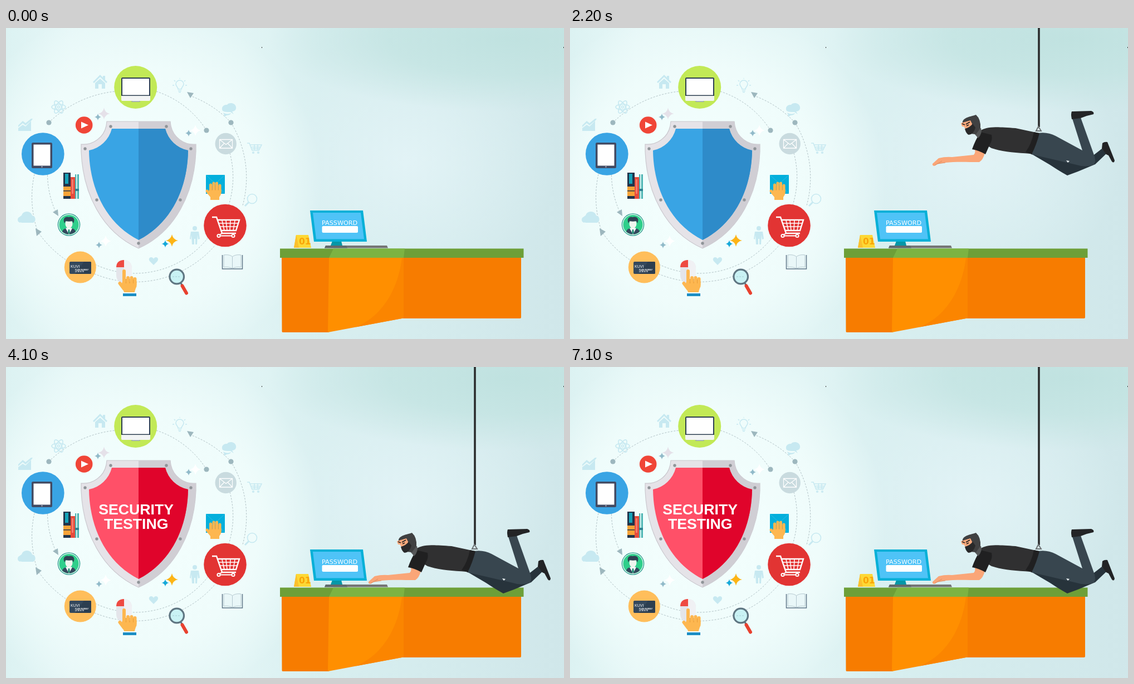
Recreate the animation shown at these times as an HTML page. Size 1002 px wide and 559 px high, loop 7600 ms.

```html
<!DOCTYPE html>
<html lang="en">
<head>
<meta charset="utf-8">
<title>Security testing</title>
<style>
html, body { margin: 0; width: 100%; height: 100%; overflow: hidden; background: #e2f4f4; }
svg { display: block; width: 1002px; height: 559px; }
.pale { fill: #c7e9f1; }
.paleLine { fill: none; stroke: #c7e9f1; stroke-width: 1.6; }
.dash { fill: none; stroke: #aebfc3; stroke-width: 1; stroke-dasharray: 3 2.4; }
.node { fill: #9db7be; }
.finger { fill: none; stroke: #fdb750; stroke-linecap: round; }
.title { font: bold 26.67px "Liberation Sans", Arial, sans-serif; fill: #fff; text-anchor: middle; }
.field { font: 11.2px "DejaVu Sans", sans-serif; fill: #fff; }
.sign { font: bold 15.6px "DejaVu Sans", sans-serif; fill: #f9a408; }
.card { font: 7px "Liberation Sans", sans-serif; fill: #fff; }
.tiny { font: italic bold 3px "Liberation Sans", sans-serif; fill: #fff; }
</style>
</head>
<body>
<svg viewBox="0 0 1002 559" xmlns="http://www.w3.org/2000/svg">
<defs>
  <linearGradient id="base">
    <stop offset="0" stop-color="#dcf2f2"/><stop offset=".12" stop-color="#e6f7f7"/>
    <stop offset=".42" stop-color="#e2f5f5"/><stop offset=".56" stop-color="#d8eff0"/>
    <stop offset="1" stop-color="#d0e7ea"/>
  </linearGradient>
  <radialGradient id="halo">
    <stop offset="0" stop-color="#f4fffe"/><stop offset=".65" stop-color="#effcfb"/>
    <stop offset="1" stop-color="#effcfb" stop-opacity="0"/>
  </radialGradient>
  <radialGradient id="glow">
    <stop offset="0" stop-color="#e2f3f6"/><stop offset="1" stop-color="#e2f3f6" stop-opacity="0"/>
  </radialGradient>
  <radialGradient id="shade">
    <stop offset="0" stop-color="#c0e2e0"/><stop offset=".5" stop-color="#c3e4e2" stop-opacity=".8"/>
    <stop offset="1" stop-color="#c6e5e3" stop-opacity="0"/>
  </radialGradient>
  <path id="star" d="M0-10Q1.6-1.6 10 0Q1.6 1.6 0 10Q-1.6 1.6-10 0Q-1.6-1.6 0-10Z"/>
  <clipPath id="rightHalf"><rect x="238" y="160" width="110" height="245"/></clipPath>
  <path id="rim" d="M181 168H295L296 176A42 42 0 0 0 341 209V222C338 296 305 366 238 396C171 366 138 296 135 222V209A42 42 0 0 0 180 176Z"/>
  <path id="plate" d="M190 181H286A53 53 0 0 0 327 220C326 288 297 351 238 381C179 351 150 288 149 220A53 53 0 0 0 190 181Z"/>
</defs>

<rect width="1002" height="559" fill="url(#base)"/>
<ellipse cx="720" cy="240" rx="270" ry="230" fill="url(#glow)"/>
<ellipse cx="900" cy="20" rx="430" ry="130" fill="url(#shade)"/>
<ellipse cx="238" cy="285" rx="330" ry="330" fill="url(#halo)"/>
<path d="M459 34h1v2h-1zM1001 34h1v2h-1z" fill="#333"/>

<!-- orbits -->
<g class="dash">
  <path d="M77 170A199 199 0 0 1 196 114M270 114A168 168 0 0 1 360 184"/>
  <path d="M404 170A190 190 0 0 0 334 123M404 170A190 190 0 0 1 425 319"/>
  <path d="M51 263A190 190 0 0 0 57 366A190 190 0 0 0 108 417M159 442A190 190 0 0 0 376 390"/>
  <path d="M84 206A167 167 0 0 0 90 332M402 225A167 167 0 0 1 400 318M160 425A167 167 0 0 0 362 378"/>
</g>
<g class="node">
  <circle cx="77" cy="170" r="4.6"/><circle cx="360" cy="184" r="4.6"/><circle cx="404" cy="170" r="4.6"/>
  <path d="M325 115L337 117L331 126ZM84 331L93 326L94 338ZM53 360L64 366L55 374Z"/>
</g>

<!-- pale icons -->
<g class="pale">
  <path d="M156 97L169 84L174 89V86H178V93L182 97L180 99L169 88L158 99ZM160 99L169 91L178 99V109H172V101H166V109H160Z"/>
  <path d="M22 180l8-6 5 3 10-10v18H22zM22 175l8-8 5 4 10-8 3 0-2 3-11 9-5-4-8 7z"/>
  <path d="M388 146a8 7 0 0 1 9-8c3-5 15-4 16 4c1 5-3 8-7 8l3 5-6-4c-8 0-15 0-15-5zM390 152c4 3 10 3 14 1c-1 3-5 4-8 4l-4 3v-3z"/>
  <path d="M28 350a7 7 0 0 1 0-13a10 10 0 0 1 19 0a7 7 0 0 1 2 13zM21 345a6 6 0 0 1 5-6v11a5 5 0 0 1-5-5z"/>
  <circle cx="339" cy="360" r="4"/>
  <path d="M332 366h14l2 13-3 1-1-8-1 17h-3v-10h-2v10h-4l-1-17-1 8-2-1z"/>
  <path d="M265 426L258 419C254 413 262 409 265 415C268 409 276 413 272 419Z"/>
</g>
<g class="paleLine">
  <g id="atom"><circle cx="94.500" cy="142" r="2"/></g>
  <path d="M309 110c0-4-4-5-4-9a7 7 0 0 1 14 0c0 4-4 5-4 9zM309 113h6M310 115.500h4M312 91v-1M299 103h3M322 103h3M302 94l2 2M322 94l-2 2"/>
  <path d="M433 207h4l5 13h12l5-10h-20M440 214h17M442 217h14M446 209v10M452 209v10"/>
  <circle cx="444" cy="224" r="1.300"/><circle cx="453" cy="224" r="1.300"/>
  <circle cx="442" cy="307" r="8.500"/><path d="M436 313l-7 7" stroke-width="3"/>
</g>

<!-- sparkles -->
<g id="stars"></g>

<!-- computer -->
<circle cx="232.700" cy="106.500" r="38.500" fill="#c2e956"/>
<path d="M227 131h12l3 2H224z" fill="#99a5ac"/><path d="M227 128h12v4h-12z" fill="#bdc6ca"/>
<rect x="207" y="89" width="52" height="42" rx="2" fill="#f2f4f4"/>
<path d="M207 122V91a2 2 0 0 1 2-2h48a2 2 0 0 1 2 2v31z" fill="#2c3e50"/>
<rect x="209" y="91" width="48" height="29.500" fill="#fff"/>

<!-- play -->
<circle cx="140.200" cy="174.500" r="15.300" fill="#f04537"/><path d="M135 168.500l13 6-13 6z" fill="#fff"/>

<!-- tablet -->
<circle cx="66.300" cy="226.500" r="38.300" fill="#39a4e4"/>
<rect x="46" y="206" width="37" height="46" rx="2.500" fill="#414a63"/>
<rect x="49.500" y="209.500" width="30" height="38" fill="#fff"/>
<circle cx="64.500" cy="249.500" r="1.200" fill="#aab"/>

<!-- books -->
<path d="M103 260h13v47h-13z" fill="#22344b"/><path d="M106 262h6v18h-6z" fill="#15a3b8"/>
<path d="M103 285h13v17h-13z" fill="#f7a338"/><path d="M103 292h13v1.500h-13z" fill="#22344b"/>
<path d="M116 268h8v39h-8z" fill="#e64b3c"/><path d="M118 272h3v26h-3z" fill="#f47d6c"/>
<path d="M124 263h7v44h-7z" fill="#4fb6b5"/><path d="M126 263h2v44h-2z" fill="#d8f1ef"/><path d="M124 289h7v4h-7z" fill="#2d8291"/>

<!-- user -->
<circle cx="113" cy="353.500" r="20.300" fill="#2a9a8d"/><circle cx="113" cy="353.500" r="19" fill="#dff7ef"/>
<circle cx="113" cy="353.500" r="17.600" fill="#2fcf8b"/>
<path d="M101 366c1-5 6-6 12-7c6 1 11 2 12 7a17.600 17.600 0 0 1-24 0z" fill="#34495e"/>
<path d="M107 360l6-2 6 2-6 11z" fill="#f4fbf9"/><path d="M112 362h2l1 6-2 2-2-2z" fill="#1e8b72"/>
<ellipse cx="113" cy="352" rx="6.500" ry="8" fill="#eef6ee"/>
<path d="M105 351c-4-9 2-13 8-11c7-2 12 3 8 11l-2-4c-4 1-8 1-12 0z" fill="#2f4153"/>

<!-- payment -->
<circle cx="133.300" cy="430" r="28.500" fill="#ffbe5b"/>
<rect x="114" y="420" width="39" height="22" rx="2" fill="#34485c"/><path d="M140 420h11a2 2 0 0 1 2 2v18a2 2 0 0 1-2 2h-26z" fill="#2c3e50"/>
<text class="card" x="116" y="430.500">KUVI</text>
<text class="tiny" x="124" y="435.500">PLAIN PAYMENT</text><text class="tiny" x="124" y="439">12 34 56 78</text>

<!-- envelope -->
<circle cx="394.700" cy="208" r="19.200" fill="#c9dbdf"/>
<path d="M383.500 200.500h23v15.500h-23zl11.500 9 11.500-9M383.500 216l8.500-9M406.500 216l-8.500-9" fill="none" stroke="#fff" stroke-width="1.300"/>

<!-- touch -->
<rect x="359" y="264" width="34" height="34" fill="#04afdc"/><path d="M359 264l17 16 17-16M393 298l-12-14" fill="none" stroke="#36c0e5" stroke-width=".8"/>
<path class="finger" stroke-width="5" d="M367.500 282V296M373 279V296M378.500 279V296M384 283V296M361 293L368 301"/>
<path d="M365 291H386.500C387 299 385 301 383 304V309H367V304L362 297Z" fill="#fdb750"/>
<path d="M370.200 284v8M375.800 283v9M381.300 284v8" stroke="#e79a35" stroke-width=".8"/>

<!-- shop -->
<circle cx="393.500" cy="355" r="38.300" fill="#e23433"/>
<g fill="none" stroke="#fff" stroke-width="2">
  <path d="M370 340h8l10 29h25M379 345h40l-6 19h-28" stroke-width="2.400"/>
  <path d="M381 351h36M384 357h31M388 346l4 18M395 346l2 18M403 346l-1 18M411 346l-3 18" stroke-width="1.500"/>
  <circle cx="382" cy="373.500" r="2.600"/><circle cx="408" cy="373.500" r="2.600"/><path d="M388 369l-5 3M384 373.500h22"/>
</g>

<!-- open book -->
<path d="M388.500 408v25h36v-25" fill="none" stroke="#5f7688" stroke-width="1.500"/>
<path d="M391 408c6-1 12 0 15.500 3c4-3 10-4 15.500-3v22c-6-1-11 0-15.500 2c-4-2-10-3-15.500-2zM406.500 411v21" fill="#e9f7f8" stroke="#b4c8cf"/>

<!-- magnifier -->
<path d="M314 459l4 5" stroke="#5b6b77" stroke-width="3"/><path d="M316.500 463.500l7.500 13" stroke="#e8412f" stroke-width="6" stroke-linecap="round"/>
<circle cx="306.700" cy="447" r="12.800" fill="#c9f2f4" stroke="#5f7682" stroke-width="3.200"/>
<path d="M299 447h15" stroke="#a6cdd3" stroke-dasharray="3 2"/>

<!-- mouse and hand -->
<path d="M198 432c0-20 28-20 28 0v12c0 20-28 20-28 0z" fill="#e4e5ea"/><path d="M212 417c9 0 14 6 14 15v12c0 9-5 14-14 14z" fill="#f0f1f4"/>
<path d="M198 430c0-8 5-13 14-13v13z" fill="#ee4a42"/>
<path class="finger" stroke-width="6" d="M212 437V464M219 449V464M225.500 449V464M231.500 451V464M204.500 459L212 469"/>
<path d="M209 456H234.500C235 466 232 469 231 475H212C211 470 208 468 206 464Z" fill="#fdb750"/>
<path d="M215.500 451v8M222 451v8M228.500 452v7" stroke="#e79a35" stroke-width=".9"/>
<path d="M210 477c8-2 16-2 24-1v6h-24z" fill="#1d8ec4"/><path d="M210 475h24v2h-24z" fill="#fff"/>

<!-- shield -->
<use href="#rim" fill="#e5e3e8" stroke="#cac8ce" stroke-width="1.200"/>
<use href="#rim" fill="#d0ced4" clip-path="url(#rightHalf)"/>
<g id="rivets" fill="#8f9498"></g>
<use id="left" href="#plate" fill="#39a4e4"/>
<use id="right" href="#plate" fill="#2e8bc9" clip-path="url(#rightHalf)"/>
<g id="title" class="title"><text x="233.700" y="264.500">SECURITY</text><text x="233.700" y="291">TESTING</text></g>

<!-- desk -->
<path d="M495 413H580V547H497Q495.500 547 495.500 545Z" fill="#f77c00"/>
<path d="M714 413H925V520Q925 522 923 522H711Z" fill="#f77c00"/>
<path d="M580 413H714V521.500L711 522L578 547Z" fill="#ff8f00"/>
<path d="M714 413V521.500L711 522L628 537.500C676 518 704 470 711 413Z" fill="#fb8500"/>
<path d="M492 396.500H929.500V413H492Z" fill="#6d9f38"/><path d="M580 413L588 396.500H716L714 413Z" fill="#7cb342"/>

<!-- number sign -->
<path d="M521 372H543L548 395H517Z" fill="#fdd835"/><path d="M521 372L526 395H517Z" fill="#fbc02d"/>
<text class="sign" x="526" y="389">01</text>

<!-- terminal -->
<path d="M586 383H602L604 391H583Z" fill="#0597a7"/>
<path d="M574 391H684L686 395.500H572Z" fill="#757575"/><path d="M574 391H611L613 395.500H572Z" fill="#616a6d"/>
<path d="M546 328H641L648 384H553Z" fill="#06b0d7"/><path d="M551 332H637L643 379.500H557Z" fill="#4fc3f7"/>
<text class="field" x="567" y="354">PASSWORD</text>
<rect x="567.500" y="356" width="64.500" height="12" rx="2" fill="#fff"/>

<!-- intruder -->
<g id="thief">
  <path d="M842-330V320" stroke="#2b2c2d" stroke-width="3.600"/>
  <path d="M828 368L862 388Q880 400 893 407L912 400L943 387L963 368L955 359L937 373L880 360Z" fill="#27333b"/>
  <path d="M955 359L956 349Q960 346 965 347L978 380Q977 386 973 382L967 371Q962 369 962 368Z" fill="#222325"/>
  <path d="M840 331C852 329 862 331 872 336L920 362L902 305L917 303L942 373Q945 384 940 388Q926 393 910 388L828 369Z" fill="#38464f"/>
  <path d="M891 380l6 1-3 3z" fill="#eef4f5"/>
  <path d="M901 306Q899 296 901 292L936 291Q942 293 940 297Q929 299 917 304Z" fill="#232426"/>
  <path d="M736 327C748 319 762 319 800 322L842 331L827 368C800 366 778 365 757 358L740 348Z" fill="#303031"/>
  <path d="M833 329L843 331Q838 351 829 369L818 365Q829 350 833 329Z" fill="#202021"/>
  <path d="M837 327L841 319L846 327Z" fill="none" stroke="#707577" stroke-width="2"/>
  <path d="M725 356L745 366Q742 379 735 383C712 383 692 382 674 384L661 386L654 390Q650 389 651 386L662 376Q674 373 686 374L725 370Q730 365 725 356Z" fill="#faa678"/>
  <path d="M655 389L668 381M660 386L674 384" stroke="#dc8558" stroke-width=".8"/>
  <path d="M737 329L757 334Q759 344 754 351L746 369Q734 362 722 360Q728 343 737 329Z" fill="#202021"/>
  <path d="M729 323L738 322Q741 331 733 340L726 332Z" fill="#555758"/>
  <path d="M705 315C703 303 717 302 729 298Q738 306 737 322L729 333L718 332Z" fill="#404142"/>
  <path d="M702 313L719 308L724 318L710 323L707 319L704 319Z" fill="#faaa7d"/>
  <path d="M709 323Q718 321 723 314L728 321Q725 333 716 334Q711 332 709 323Z" fill="#29292a"/>
  <path d="M704 314L709 316M711 315L718 311M712 318l4-2" stroke="#222" stroke-width="1.600"/>
</g>
</svg>

<script>
const el = id => document.getElementById(id);
const ns = "http://www.w3.org/2000/svg";
const add = (parent, tag, attrs) => {
  const node = document.createElementNS(ns, tag);
  for (const key in attrs) node.setAttribute(key, attrs[key]);
  el(parent).append(node);
};

[0, 60, 120].forEach(angle =>
  add("atom", "ellipse", { rx: 12.5, ry: 5, transform: `translate(94.5 142) rotate(${angle})` }));

[[165, 160, .6, "#91bac9"], [176, 154, 1.05, "#e5e1e9"], [328, 189, .6, "#91bac9"],
 [340, 184, 1, "#ffffff"], [167, 390, .6, "#91bac9"], [179, 383, 1, "#ffffff"],
 [286, 388, .65, "#16a9d9"], [298, 382, 1.1, "#fdb415"]]
  .forEach(([x, y, size, fill]) =>
    add("stars", "use", { href: "#star", fill, transform: `translate(${x} ${y}) scale(${size})` }));

[[188, 177], [288, 177], [142, 217], [332, 217], [163, 309], [313, 309], [238, 387]]
  .forEach(([cx, cy]) => add("rivets", "circle", { cx, cy, r: 2.7 }));

// Height of the intruder above the desk pose: [ms, px]
const drop = [[200, -357], [1000, -269], [1200, -247], [2200, -142],
              [2400, -120], [3000, -52], [3600, 0]];
const LOOP = 7600, STEP = 200, ALARM = 3600, BLINK = 500;

function heightAt(t) {
  const i = drop.findIndex(key => key[0] > t);
  if (i < 0) return 0;
  const [t0, y0] = drop[i - 1], [t1, y1] = drop[i];
  return y0 + (y1 - y0) * (t - t0) / (t1 - t0);
}

const start = performance.now();
function draw() {
  const t = (performance.now() - start) % LOOP;
  const held = Math.floor(t / STEP) * STEP;
  const alarm = t >= ALARM;
  const visible = t >= STEP;
  el("thief").style.display = visible ? "" : "none";
  if (visible) el("thief").setAttribute("transform", `translate(0 ${Math.round(heightAt(held))})`);
  el("left").setAttribute("fill", alarm ? "#ff5068" : "#39a4e4");
  el("right").setAttribute("fill", alarm ? "#e0042b" : "#2e8bc9");
  el("title").style.display = alarm && Math.floor((t - ALARM) / BLINK) % 2 ? "" : "none";
  requestAnimationFrame(draw);
}
draw();
</script>
</body>
</html>
```
